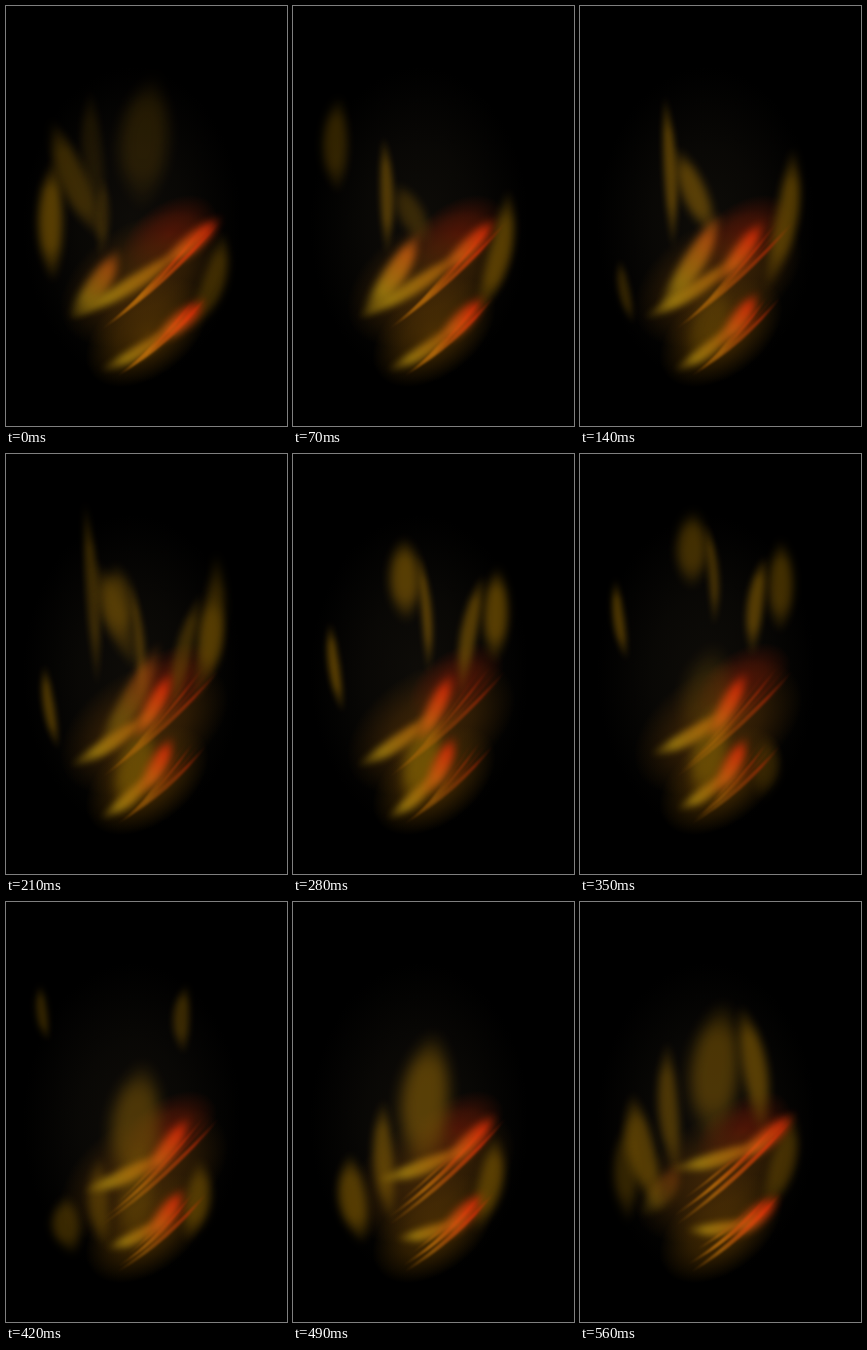
An HTML page with a canvas that plays this animation: 289 by 431 pixels, repeating every 0.63 s.

```html
<!DOCTYPE html>
<html lang="en">
<head>
<meta charset="utf-8">
<title>Flame</title>
<style>
  html, body { margin: 0; width: 100%; height: 100%; overflow: hidden; background: #000; }
  canvas { display: block; }
</style>
</head>
<body>
<canvas id="stage" width="289" height="431"></canvas>
<script>
const ctx = document.getElementById('stage').getContext('2d');
const STEPS = 9, STEP_MS = 70;
const SMOKE = '#6c4c00', OLIVE = '#7c5c00', YELLOW = '#b08a10',
      AMBER = '#b86c0c', ORANGE = '#d06010', RED = '#e03008', EMBER = '#701600';

const lerp = (a, b, k) => a + (b - a) * k;
const between = (p, q, k) => [lerp(p[0], q[0], k), lerp(p[1], q[1], k)];

// A soft tapered blade; bend pushes its middle sideways.
function blade(tail, tip, { width, bend = 0, colors, blur, opacity }) {
  const [x0, y0] = tail, [x1, y1] = tip;
  const length = Math.hypot(x1 - x0, y1 - y0) || 1;
  const nx = (y0 - y1) / length, ny = (x1 - x0) / length;
  const control = side => [
    (x0 + x1) / 2 + nx * (bend + side * width),
    (y0 + y1) / 2 + ny * (bend + side * width)
  ];
  const fill = ctx.createLinearGradient(x0, y0, x1, y1);
  fill.addColorStop(0, colors[0] + '30');
  fill.addColorStop(.3, colors[0]);
  fill.addColorStop(.75, colors[1]);
  fill.addColorStop(1, colors[1] + '20');
  ctx.globalAlpha = opacity;
  ctx.filter = `blur(${blur}px)`;
  ctx.fillStyle = fill;
  ctx.beginPath();
  ctx.moveTo(x0, y0);
  ctx.quadraticCurveTo(...control(1), x1, y1);
  ctx.quadraticCurveTo(...control(-1), x0, y0);
  ctx.fill();
}

function glow(x, y, radius, squash, angle, color, opacity) {
  ctx.save();
  ctx.globalAlpha = opacity;
  ctx.filter = 'none';
  ctx.translate(x, y);
  ctx.rotate(angle);
  ctx.scale(1, squash);
  const fill = ctx.createRadialGradient(0, 0, 0, 0, 0, radius);
  fill.addColorStop(0, color);
  fill.addColorStop(.5, color + 'a0');
  fill.addColorStop(1, color + '00');
  ctx.fillStyle = fill;
  ctx.fillRect(-radius, -radius, 2 * radius, 2 * radius);
  ctx.restore();
}

// Wisps live from one step to another; tip and tail each go from a start to an end point.
const wisps = [
  { life: [4.5, 9.5], tip: [[138, 210], [153, 55]], tail: [[130, 310], [142, 185]], width: 48, bend: -8 },
  { life: [5, 10], tip: [[64, 320], [40, 23]], tail: [[70, 362], [140, 106]], width: 27, bend: -10, rise: 1.7 },
  { life: [7.5, 10.5], tip: [[52, 255], [46, 60]], tail: [[50, 335], [44, 130]], width: 24, bend: -6 },
  { life: [5, 9.3], tip: [[100, 320], [86, 65]], tail: [[103, 365], [100, 200]], width: 20, bend: -10 },
  { life: [7, 9], tip: [[170, 150], [160, 60]], tail: [[187, 250], [187, 200]], width: 24, bend: 8 },
  { life: [8.5, 12.8], tip: [[102, 195], [76, 15]], tail: [[97, 260], [92, 230]], width: 13, bend: 4 },
  { life: [9.5, 12.5], tip: [[110, 200], [88, 90]], tail: [[140, 245], [135, 215]], width: 24, bend: -3 },
  { life: [11, 15], tip: [[126, 160], [130, 40]], tail: [[140, 265], [136, 110]], width: 10, bend: 8 },
  { life: [11, 15], tip: [[110, 140], [118, 30]], tail: [[118, 200], [112, 90]], width: 30 },
  { life: [4.5, 9], tip: [[185, 300], [228, 190]], tail: [[185, 355], [190, 300]], width: 24, bend: 10 },
  { life: [8, 12.8], tip: [[227, 274], [214, 66]], tail: [[186, 340], [195, 220]], width: 22, bend: 16 },
  { life: [11, 16], tip: [[207, 160], [180, 65]], tail: [[170, 275], [190, 90]], width: 16, bend: -8 },
  { life: [11, 15], tip: [[216, 170], [204, 60]], tail: [[208, 240], [204, 140]], width: 24 },
  { life: [10, 16], tip: [[42, 302], [34, 40]], tail: [[56, 335], [38, 60]], width: 11, bend: -5 },
  { life: [1.5, 6.5], tip: [[148, 290], [138, 240]], tail: [[118, 372], [130, 345]], width: 34, colors: [OLIVE, OLIVE] },
  { life: [7.5, 12.8], tip: [[95, 277], [170, 177]], tail: [[62, 322], [105, 305]], width: 22, bend: 8, colors: [YELLOW, ORANGE] }
];

function drawWisp({ life: [from, to], tip, tail, rise = 1, width, bend, colors = [SMOKE, SMOKE] }, step) {
  const time = step < from ? step + STEPS : step;
  const age = (time - from) / (to - from);
  if (age < 0 || age > 1) return;
  const lift = age ** rise;
  blade(between(...tail, lift * lift), between(...tip, lift), {
    width, bend, colors, blur: 2 + width / 9, opacity: .8 * Math.sin(Math.PI * age) ** .8
  });
}

// A sheaf is a yellow tongue feeding a red core, laced with fine streaks.
const sheaves = [
  { tail: [66, 320], drift: [28, -46], core: [172, 247], swing: 24, drop: -9, size: 1, root: [98, 332], point: [220, 221] },
  { tail: [97, 374], drift: [12, -38], core: [168, 318], swing: 15, drop: 2, size: .85, root: [114, 380], point: [207, 298] }
];

function drawSheaf({ tail, drift, core, swing, drop, size, root, point }, step) {
  const sway = Math.cos(2 * Math.PI * (step + .5) / STEPS);
  const lift = Math.max(0, step - 4) / 4;
  const heart = [core[0] + swing * sway, core[1] + drop * sway];
  const start = [tail[0] + drift[0] * lift, tail[1] + drift[1] * lift];
  const angle = .9 - .22 * sway;
  const along = reach => [
    heart[0] + Math.cos(angle) * reach * size,
    heart[1] - Math.sin(angle) * reach * size
  ];

  blade(start, along(-12), { width: 15 * size, bend: 8, colors: [YELLOW, AMBER], blur: 3.5, opacity: .75 });
  blade(along(-46), along(36), { width: 17, bend: 3, colors: [ORANGE, RED], blur: 4, opacity: .85 });
  for (let i = 0; i < 4; i++) {
    const spread = i * 9 * size;
    const from = [root[0] + spread * .6 - 8 * lift * (i % 2), root[1] - spread * (.4 + lift * .6)];
    const to = [point[0] - spread * .9, point[1] + spread * .25 * sway];
    blade(from, to, {
      width: 4.5 - i * .7, bend: 9 - i, colors: [AMBER, i % 2 ? EMBER : RED],
      blur: 1.3, opacity: .55 + .15 * sway
    });
  }
}

function draw(step) {
  ctx.globalCompositeOperation = 'source-over';
  ctx.globalAlpha = 1;
  ctx.filter = 'none';
  ctx.fillStyle = '#000';
  ctx.fillRect(0, 0, 289, 431);
  ctx.globalCompositeOperation = 'lighten';
  glow(130, 225, 112, 1.45, 0, '#0e0c08', 1);
  glow(142, 280, 95, .62, -.55, '#4c2c00', .85);
  glow(145, 335, 72, .62, -.65, '#543400', .85);
  glow(168, 235, 55, .6, -.6, '#541400', .9);
  for (const wisp of wisps) drawWisp(wisp, step);
  for (const sheaf of sheaves) drawSheaf(sheaf, step);
}

const start = performance.now();
let shown = -1;
function tick() {
  const step = Math.floor((performance.now() - start) / STEP_MS) % STEPS;
  if (step !== shown) draw(shown = step);
  requestAnimationFrame(tick);
}
tick();
</script>
</body>
</html>
```
